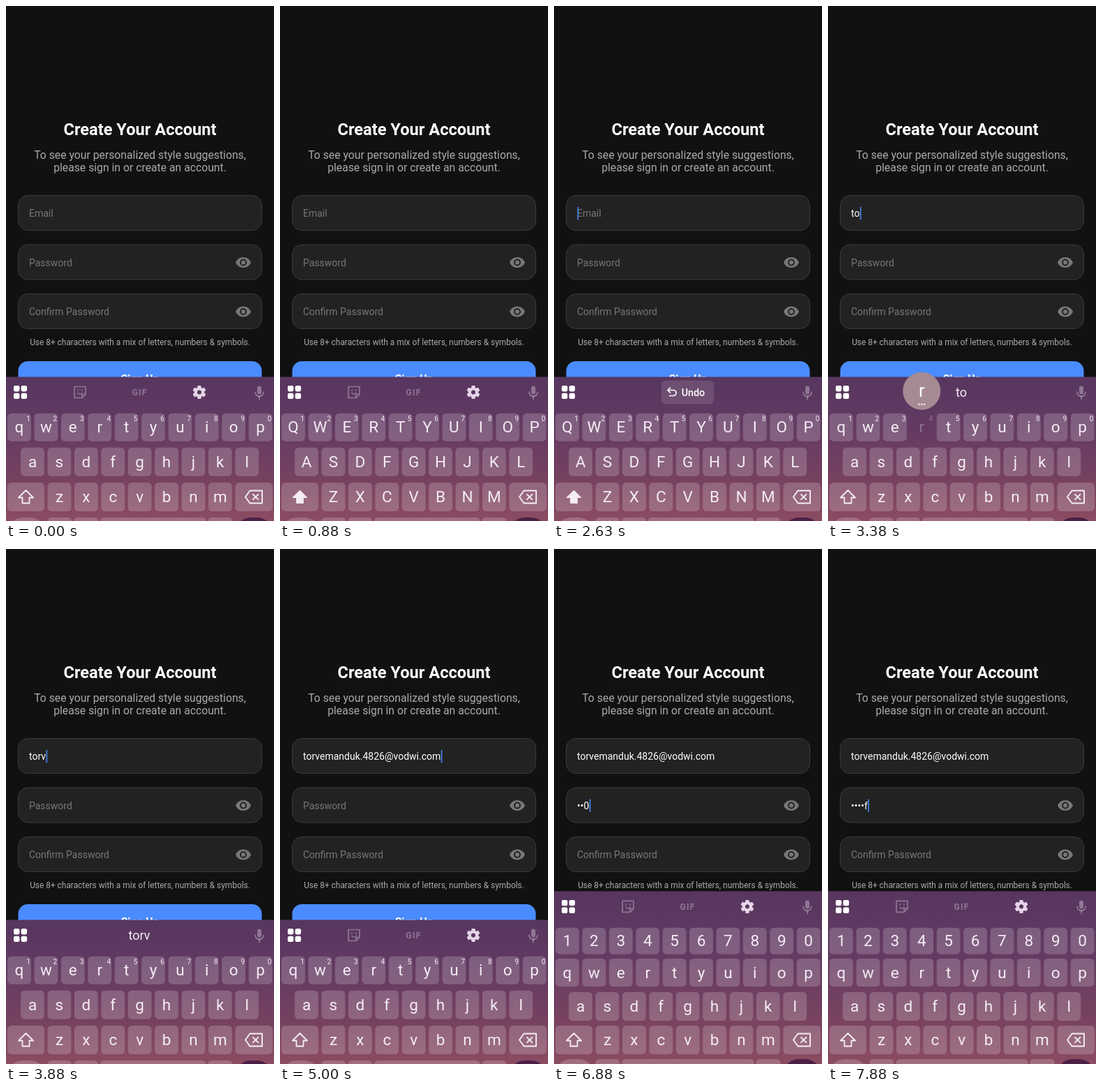
These frames come from a looping animation (384x738 px, 8 s). An HTML page with a canvas:

```html
<!DOCTYPE html>
<html lang="en">
<head>
<meta charset="utf-8">
<title>Sign up</title>
<style>
  html, body { margin: 0; width: 100%; height: 100%; overflow: hidden; background: #111; }
  canvas { display: block; width: 384px; height: 738px; }
</style>
</head>
<body>
<canvas id="stage"></canvas>
<script>
const W = 384, H = 738, LOOP = 8000, PRESS = 125;
const canvas = document.getElementById('stage');
const ctx = canvas.getContext('2d');
const dpr = window.devicePixelRatio || 1;
canvas.width = W * dpr;
canvas.height = H * dpr;

const EMAIL = 'torvemanduk.4826@vodwi.com';
const FOCUS_PASSWORD = 5125;
const INK = '#f5edf4', DIM = 'rgba(255,255,255,.32)';

// Typed keys: [commit time, character]
const capsTyping = [[1250, 'T'], [1500, 'O'], [1750, 'R'], [2000, 'V']];
const emailTyping = [[3125, 't'], [3375, 'o'], [3500, 'r'], [3750, 'v'],
                     [4250, 'e'], [4375, 'm'], [4500, 'a'], [4625, 'n']];
const passTyping = [[6500, 'k'], [6750, '7'], [6875, '0'], [7375, '1'], [7875, 'f']];
const allTyping = [...capsTyping, ...emailTyping, ...passTyping];
const erasing = [2250, 2375, 2440, 2500];
const FILL_TIME = 4875;
const edits = [125, ...allTyping.map(k => k[0]), ...erasing, FILL_TIME, FOCUS_PASSWORD];
const shiftTaps = [500, 2750, 6250];

const within = (t, a, b) => t >= a && t < b;
const typed = (keys, t) => keys.filter(k => k[0] <= t).map(k => k[1]).join('');

function stateAt(t) {
  let email;
  if (t >= FILL_TIME) email = EMAIL;
  else if (t >= 2500) email = typed(emailTyping, t);
  else {
    const word = typed(capsTyping, t);
    email = word.slice(0, word.length - erasing.filter(e => e <= t).length);
  }
  const secret = typed(passTyping, t);
  const press = allTyping.find(k => within(t, k[0] - PRESS, k[0]));
  const lastEdit = Math.max(-1, ...edits.filter(e => e <= t));
  return {
    email,
    hint: t < FILL_TIME ? email : '',
    secret: secret && '•'.repeat(secret.length - 1) + secret.slice(-1),
    tall: t >= FOCUS_PASSWORD,
    upper: within(t, 625, 2875) || within(t, FOCUS_PASSWORD, 6375),
    caret: lastEdit >= 0 && (t - lastEdit) % 1000 < 500,
    pressed: press ? press[1] : '',
    shiftDown: shiftTaps.some(s => within(t, s, s + PRESS)),
    eraseDown: within(t, 2125, 2500),
    undo: within(t, 2500, 3125),
    chip: within(t, FOCUS_PASSWORD, 6375)
  };
}

function box(x, y, w, h, r, fill, line) {
  ctx.beginPath();
  ctx.roundRect(x, y, w, h, r);
  if (fill) { ctx.fillStyle = fill; ctx.fill(); }
  if (line) { ctx.strokeStyle = line; ctx.lineWidth = 1; ctx.stroke(); }
}

function text(s, x, y, size, color, align = 'center', weight = 400) {
  ctx.font = `${weight} ${size}px Roboto, sans-serif`;
  ctx.textAlign = align;
  ctx.fillStyle = color;
  ctx.fillText(s, x, y);
}

function poly(points, close) {
  ctx.beginPath();
  points.forEach(([x, y]) => ctx.lineTo(x, y));
  if (close) ctx.closePath();
}

function stroke(color, width) {
  ctx.strokeStyle = color;
  ctx.lineWidth = width;
  ctx.stroke();
}

function disc(x, y, r, color) {
  ctx.beginPath();
  ctx.arc(x, y, r, 0, Math.PI * 2);
  ctx.fillStyle = color;
  ctx.fill();
}

function at(x, y, draw) {
  ctx.save();
  ctx.translate(x, y);
  draw();
  ctx.restore();
}

const eyeShape = new Path2D('M0-7.5C-5-7.5-9.27-4.39-11 0C-9.27 4.39-5 7.5 0 7.5S9.27 4.39 11 0C9.27-4.39 5-7.5 0-7.5z' +
  'M5 0A5 5 0 1 1-5 0A5 5 0 1 1 5 0zM3 0A3 3 0 1 1-3 0A3 3 0 1 1 3 0z');

function field(y, label, value, caret, eye) {
  box(17.5, y, 349, 50, 14, '#222', '#3b3b3b');
  text(value || label, 33, y + 30.5, 14, value ? '#fff' : '#777', 'left');
  if (caret) {
    const w = value ? ctx.measureText(value).width : 0;
    ctx.fillStyle = '#3f7fdc';
    ctx.fillRect(33.4 + w, y + 16.5, 1.8, 18.5);
  }
  if (eye) at(340, y + 25.5, () => {
    ctx.fillStyle = '#787878';
    ctx.fill(eyeShape, 'evenodd');
  });
}

function form(s) {
  ctx.fillStyle = '#111';
  ctx.fillRect(0, 0, W, H);
  text('Create Your Account', 192, 185.4, 23.6, '#fff', 'center', 700);
  text('To see your personalized style suggestions,', 192, 218.6, 15.75, '#aaa');
  text('please sign in or create an account.', 192, 237.4, 15.75, '#aaa');
  field(271.5, 'Email', s.email, s.caret && !s.tall, false);
  field(342, 'Password', s.secret, s.caret && s.tall, true);
  field(412.5, 'Confirm Password', '', false, true);
  text('Use 8+ characters with a mix of letters, numbers & symbols.', 192, 485.5, 11.9, '#aaa');
  box(17.5, 509, 349, 51, 14, '#4a8cff');
  text('Sign Up', 192, 540, 15.7, '#fff', 'center', 700);
}

function sticker() {
  poly([[3, 8], [-8, 8], [-8, -8], [8, -8], [8, 3], [3, 8], [3, 3], [8, 3]]);
  stroke(DIM, 1.7);
  disc(-3, -3, 1.1, DIM);
  disc(3, -3, 1.1, DIM);
  ctx.beginPath();
  ctx.arc(0, -1, 3.6, .5, 2.6);
  stroke(DIM, 1.4);
}

function gear() {
  const color = '#e6d6e8';
  ctx.beginPath();
  ctx.arc(0, 0, 5.2, 0, Math.PI * 2);
  stroke(color, 4.2);
  for (let i = 0; i < 6; i++) {
    ctx.rotate(Math.PI / 3);
    box(-2.6, -9.5, 5.2, 4, 1, color);
  }
}

function mic() {
  box(-3, -9.5, 6, 12, 3, DIM);
  ctx.beginPath();
  ctx.arc(0, -.5, 6, 0, Math.PI);
  stroke(DIM, 1.8);
  poly([[0, 5.5], [0, 9.5]]);
  stroke(DIM, 1.8);
}

function undoChip() {
  box(-37.5, -17, 75, 34, 6, 'rgba(255,255,255,.12)');
  poly([[-25, -6.5], [-28.5, -3], [-25, .5]]);
  stroke('#fff', 1.7);
  ctx.beginPath();
  ctx.moveTo(-28, -3);
  ctx.lineTo(-20.5, -3);
  ctx.arc(-20.5, 1, 4, -Math.PI / 2, Math.PI / 2);
  ctx.lineTo(-26, 5);
  stroke('#fff', 1.7);
  text('Undo', 8, 5, 14.3, '#fff', 'center', 500);
}

function passwordChip() {
  box(-56, -17, 112, 34, 6, 'rgba(255,255,255,.12)');
  ctx.beginPath();
  ctx.arc(-43.5, 0, 3.6, 0, Math.PI * 2);
  stroke('#fff', 3.6);
  ctx.fillStyle = '#fff';
  ctx.fillRect(-39, -2, 9, 4);
  ctx.fillRect(-34.5, 0, 4, 5);
  text('Passwords', 10.2, 5, 14.2, '#fff', 'center', 500);
}

function toolbar(s, y) {
  for (const dx of [0, 10.7]) for (const dy of [0, 10.7])
    box(11 + dx, y - 9.5 + dy, 8.4, 8.4, 2.3, '#fff');
  at(363, y + .5, mic);
  if (s.chip) at(191.5, y, passwordChip);
  else if (s.undo) at(191.5, y, undoChip);
  else if (s.hint) text(s.hint, 191, y + 6.5, 18, INK);
  else {
    at(106, y, sticker);
    ctx.letterSpacing = '1.2px';
    text('GIF', 191.5, y + 4.5, 12, DIM, 'center', 700);
    ctx.letterSpacing = '0px';
    at(277, y, gear);
  }
}

const KEY = 'rgba(255,255,255,.19)', DOWN = 'rgba(255,255,255,.36)';

function keyRow(chars, cx, y, h, s, hints) {
  [...chars].forEach((c, i) => {
    const x = cx + i * 38.4;
    const label = s.upper ? c.toUpperCase() : c;
    const held = s.pressed === label;
    if (!held) box(x - 16.9, y, 33.8, h, 5.5, KEY);
    const color = held ? 'rgba(255,255,255,.28)' : INK;
    text(label, x, y + h / 2 + 7.7, 22.5, color);
    if (hints) text((i + 1) % 10, x + 13, y + 11, 10, color);
    if (held) s.bubble = { x, y: y + h / 2 - 52, label, dots: hints };
  });
}

function shiftKey(s, y) {
  box(2, y, 53, 41, 5.5, s.shiftDown ? DOWN : KEY);
  at(28.5, y + 20.5, () => {
    poly([[0, -9.5], [10.5, 1], [5, 1], [5, 9], [-5, 9], [-5, 1], [-10.5, 1]], true);
    if (s.upper) { ctx.fillStyle = INK; ctx.fill(); }
    stroke(INK, s.upper ? .8 : 1.8);
  });
}

function eraseKey(s, y) {
  box(328.5, y, 53.5, 41, 5.5, s.eraseDown ? DOWN : KEY);
  at(355, y + 20.5, () => {
    poly([[-12, 0], [-5.5, -9], [12, -9], [12, 9], [-5.5, 9]], true);
    stroke(INK, 1.9);
    for (const d of [1, -1]) {
      poly([[-1, -3.7 * d], [6.4, 3.7 * d]]);
      stroke(INK, 1.9);
    }
  });
}

function keyboard(s) {
  const top = s.tall ? 490.4 : 531.5;
  const shade = ctx.createLinearGradient(0, top, 0, H);
  shade.addColorStop(0, '#57365f');
  shade.addColorStop(.35, '#633a62');
  shade.addColorStop(.7, '#764160');
  shade.addColorStop(1, '#8b4c62');
  ctx.fillStyle = shade;
  ctx.fillRect(0, top, W, H - top);

  toolbar(s, top + 22);
  if (s.tall) keyRow('1234567890', 19, 542.7, 38, s);
  keyRow('qwertyuiop', 19, s.tall ? 587 : 583.7, 40, s, !s.tall);
  keyRow('asdfghjkl', 38, s.tall ? 635 : 632.7, 41, s);
  keyRow('zxcvbnm', 76.5, 683, 41, s);
  shiftKey(s, 683);
  eraseKey(s, 683);

  const y = s.tall ? 731 : 733;
  box(2, y, 55, 48, 22, KEY);
  box(59.5, y, 34.5, 41, 5.5, KEY);
  if (!s.tall) box(97.5, y, 34.5, 41, 5.5, KEY);
  const left = s.tall ? 97.5 : 135;
  box(left, y, 286.5 - left, 41, 5.5, KEY);
  box(289.5, y, 35, 41, 5.5, KEY);
  box(328.5, y, 53.5, 48, 22, '#4c1f45');

  if (s.bubble) {
    const b = s.bubble;
    disc(b.x, b.y, 27, '#a58a94');
    text(b.label, b.x, b.y + 8.5, 25.5, '#fff');
    if (b.dots) for (const d of [-4, 0, 4]) disc(b.x + d, b.y + 19, 1.2, '#fff');
  }
}

function draw(t) {
  const s = stateAt(t);
  ctx.setTransform(dpr, 0, 0, dpr, 0, 0);
  ctx.lineJoin = 'round';
  ctx.lineCap = 'round';
  form(s);
  keyboard(s);
}

const start = performance.now();
function tick() {
  draw((performance.now() - start) % LOOP);
  requestAnimationFrame(tick);
}
tick();
</script>
</body>
</html>
```
